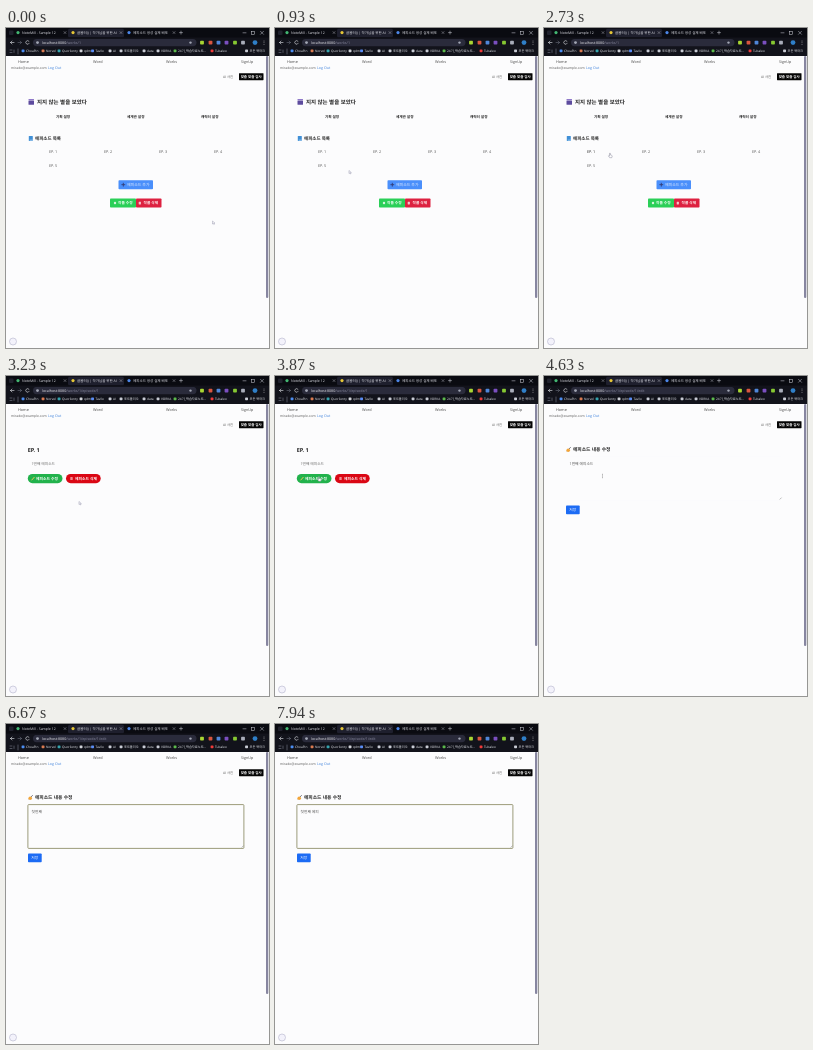
An HTML page that plays this animation: 263 px wide and 320 px high, repeating every 8 s.

```html
<!DOCTYPE html>
<html lang="ko">
<head>
<meta charset="utf-8">
<title>Episode editor</title>
<style>
html, body { margin: 0; width: 100%; height: 100%; overflow: hidden; background: #fcfcfd; }
svg { display: block; width: 263px; height: 320px; }
text {
  font-family: "Open Sans", "Noto Sans CJK KR", "Noto Sans CJK", "Noto Sans", sans-serif;
  text-rendering: geometricPrecision;
  white-space: pre;
}
</style>
</head>
<body>
<svg id="stage" viewBox="0 0 263 320" xmlns="http://www.w3.org/2000/svg"></svg>
<script>
const LOOP = 8000;
const stage = document.getElementById('stage');

const rect = (x, y, w, h, fill, r = 0, extra = '') =>
  `<rect x="${x}" y="${y}" width="${w}" height="${h}" rx="${r}" fill="${fill}" ${extra}/>`;
const dot = (x, y, r, fill) => `<circle cx="${x}" cy="${y}" r="${r}" fill="${fill}"/>`;
const line = (d, color, w = 0.6) =>
  `<path d="${d}" fill="none" stroke="${color}" stroke-width="${w}" stroke-linecap="round"/>`;
const text = (x, y, size, str, fill = '#444', weight = 400, extra = '') =>
  `<text x="${x}" y="${y}" font-size="${size}" fill="${fill}" font-weight="${weight}" ${extra}>${str}</text>`;
const group = (id, ...parts) => `<g id="${id}">${parts.join('')}</g>`;

function tab(x, w, icon, label, active) {
  return (active ? rect(x, 0.8, w, 8.4, '#1e1f2d', 1.5) : '') +
    dot(x + 5, 4.6, 1.6, icon) +
    text(x + 9, 5.9, 3.5, label, '#e4e5ec', 500) +
    line(`M${x + w - 4} 3.600l2 2m0-2l-2 2`, '#c4c6d0', 0.4);
}

function browser() {
  const marks = [
    [17, '#4c8df0', 'ChoaPin'], [37, '#d97a50', 'Norvel'], [53, '#35a3ad', 'Quorilenty'],
    [75, '#d0d2d8', 'qdm'], [86.5, '#5b8df5', 'Tavilo'], [104, '#c9ccd5', 'AI'],
    [115, '#c9ccd5', '포트폴리오'], [138, '#c9ccd5', 'data'], [152, '#c9ccd5', 'VORKA'],
    [169, '#5cba4c', '24기_학습자료노트...'], [206, '#ee3a3a', 'Tubaleo'],
    [240.5, '#c9ccd5', '모든 북마크']
  ];
  const tools = [[196, '#a9d632'], [204.5, '#d8553f'], [212.5, '#4f86d8'],
    [220.5, '#7b4fc0'], [229, '#86c832'], [237, '#a9adba']];
  return [
    rect(0, 0, 263, 28, '#0a0b11'),
    rect(3, 2.5, 4.5, 4.5, '#20222d', 1),
    tab(7, 55, '#43b873', 'NoteMill - Sample 12'),
    tab(62, 56, '#e6c736', '글봄터() | 작가님을 위한 AI', true),
    tab(118, 53, '#4c86e8', '에피소드 생성 실제 배포'),
    line('M173.500 4.600h3m-1.500-1.500v3', '#d3d5de', 0.5),
    line('M237 4.800h3M254.500 3.300l3 3m0-3l-3 3', '#d3d5de', 0.5),
    rect(245.5, 3.3, 3, 3, 'none', 0, 'stroke="#d3d5de" stroke-width=".5"'),
    rect(0, 9.5, 263, 18.5, '#12131b'),
    line('M8 14.500H4.500m1.500-1.500l-1.500 1.500 1.500 1.500', '#e3e4ea', 0.6),
    line('M12 14.500h3.500m-1.500-1.500l1.500 1.500-1.500 1.500', '#777b88', 0.5),
    line('M23 13.300a1.800 1.800 0 1 0 .2 2', '#e3e4ea', 0.6),
    rect(27, 10.9, 163.5, 7.4, '#2a2b3b', 3.7),
    dot(31.5, 14.6, 1.4, '#a3a7b5'),
    text(36, 15.9, 3.6, 'localhost:8080<tspan id="path" fill="#8a8ba0"></tspan>', '#f0f0f5', 500),
    dot(184.5, 14.6, 1.2, '#a3a7b5'),
    ...tools.map(([x, c]) => rect(x - 1.9, 12.7, 3.8, 3.8, c, 0.8)),
    dot(249, 14.6, 2.4, '#2f7fc8'),
    ...[13, 14.6, 16.2].map(y => dot(258, y, 0.45, '#ddd')),
    line('M4 22h2m-2 2.500h2M8 22v2.500M12 21v5', '#8d91a0', 0.5),
    ...marks.map(([x, c, label]) =>
      rect(x - 1.4, 21.4, 2.9, 2.9, c, 0.7) + text(x + 3, 24.2, 3.2, label, '#eceef4', 500))
  ].join('');
}

function header() {
  return [
    text(12, 35.2, 3.8, 'Home'), text(87, 35.2, 3.8, 'Word'),
    text(160, 35.2, 3.8, 'Works'), text(235, 35.2, 3.7, 'SignUp'),
    text(5, 40.7, 3.4, 'mirado@example.com', '#555'),
    text(42, 40.7, 3.6, 'Log Out', '#3f82dc'),
    text(217, 50.2, 3.4, 'AI 사진', '#555'),
    rect(233, 45.2, 24.5, 7, '#050505', 0.4),
    text(245.2, 50, 3.5, '맞춤 맞춤 검사', '#fff', 700, 'text-anchor="middle"'),
    rect(260, 28, 2.3, 242, '#8786a0', 1.1),
    `<circle cx="7" cy="313.5" r="3.5" fill="#f3f2fb" stroke="#b4b4cc" stroke-width=".6"/>`
  ].join('');
}

function listPage() {
  const eps = [[43, 124.5], [98, 124.5], [153, 124.5], [208, 124.5], [43, 139.3]];
  return group('list',
    rect(22.5, 72.5, 5.5, 4.2, '#5d4b9e', 0.5), rect(22.5, 71, 5.5, 1.3, '#8f79c9', 0.3),
    text(31, 75.9, 5.5, '지지 않는 별을 보았다', '#222', 700),
    text(50, 90, 3.6, '기획 설정', '#222', 700),
    text(121, 90, 3.6, '세계관 설정', '#222', 700),
    text(195, 90, 3.6, '캐릭터 설정', '#222', 700),
    rect(22.8, 108, 4, 5, '#3f8fd6', 0.5), rect(23.7, 111.8, 3, 0.6, '#e4f0fa'),
    text(29, 112.1, 4.5, '에피소드 목록', '#222', 700),
    ...eps.map(([x, y], i) => text(x, y, 3.8, 'EP. ' + (i + 1), '#555', 400, i ? '' : 'id="ep"')),
    rect(112.5, 152.2, 34.5, 9, '#4a8ffb', 0.8),
    line('M115.800 156.700h3m-1.500-1.500v3', '#343b74', 0.9),
    text(121, 158.1, 3.9, '에피소드 추가', '#eaf2ff', 500),
    rect(104, 170.5, 26, 9.1, '#2bcf58', 0.8), rect(130, 170.5, 25.5, 9.1, '#dd2140', 0.8),
    dot(109, 175, 1.2, '#d7f4de'), rect(132.7, 173.7, 2.2, 2.7, '#f4c7ce', 0.3),
    text(112, 176.4, 3.7, '작품 수정', '#f2fff5', 700),
    text(137.5, 176.4, 3.7, '작품 삭제', '#fff1f2', 700));
}

function viewPage() {
  return group('view',
    text(21.7, 75.9, 5.5, 'EP. 1', '#222', 700),
    text(25.5, 88.9, 3.7, '1번째 에피소드', '#666'),
    rect(21.8, 98, 34.7, 9.2, '#22b24c', 4.6), rect(60, 98, 34.7, 9.2, '#da0714', 4.6),
    line('M25.800 104l2.400-2.700', '#e7c55a', 1),
    rect(64.3, 101.1, 2.4, 3, '#f08b91', 0.4),
    text(30, 104, 3.8, '에피소드 수정', '#fff', 700),
    text(69, 104, 3.8, '에피소드 삭제', '#fff', 700));
}

function editPage() {
  return group('edit',
    line('M23.200 75l3.300-3.600', '#474a58', 0.7), dot(24.2, 74.3, 1.8, '#f2a53a'),
    text(29, 75.2, 4.75, '에피소드 내용 수정', '#222', 700),
    rect(21.9, 80.6, 216, 43.8, '#fcfcfd', 0.8, 'id="field" stroke-width=".8"'),
    line('M236 123.200l1.300-1.300', '#777', 0.5),
    rect(25.5, 84.2, 23.5, 5.4, '#2f7de0', 0, 'id="mark"'),
    text(25.5, 88.6, 3.75, '', '#555', 400, 'id="typed"'),
    rect(22, 129.5, 13.7, 8.7, '#1c6bf4', 0.8),
    text(25.3, 135.2, 3.8, '저장', '#fff', 500));
}

const pointers = group('pointer',
  '<path id="arrow" d="M0 0v3l.8-.6.500 1.100.6-.3-.5-1.100h1z" fill="#fff" stroke="#8485a0" stroke-width=".4"/>',
  '<path id="hand" d="M-.5-2.200q.5-.6.900 0v1.700l1.400.4q.5.200.4.700l-.4 1.600h-2.100l-1.300-1.800.4-.4.700.5z" fill="#fff" stroke="#6c6d84" stroke-width=".4"/>',
  '<path id="beam" d="M-.5-1.800h1M0-1.800v3.600M-.5 1.800h1" fill="none" stroke="#777" stroke-width=".4"/>');

stage.innerHTML = rect(0, 0, 263, 320, '#fcfcfd') + browser() + header() +
  listPage() + viewPage() + editPage() + pointers;

const $ = id => document.getElementById(id);
const show = (id, on) => $(id).setAttribute('visibility', on ? 'inherit' : 'hidden');

// time, x, y
const moves = [
  [0, 206.5, 193], [400, 206.5, 193], [630, 72, 172], [800, 72, 172], [930, 74, 142.5],
  [1360, 66, 127.5], [2730, 66, 127.5], [3000, 66, 127], [3230, 73, 125.5],
  [3570, 50, 106], [3800, 44, 103], [4000, 44, 103], [4370, 58.5, 100],
  [4630, 58.5, 100], [4720, 50, 87], [4860, 5, 86], [5000, 39, 132], [LOOP, 39, 132]
];
const looks = [[0, 'arrow'], [1250, 'hand'], [2860, 'arrow'], [3600, 'hand'], [3960, 'arrow'], [4200, 'beam']];
const pages = [[0, 'list', '/works/1'], [2860, 'view', '/works/1/episode/1'], [3960, 'edit', '/works/1/episode/1/edit']];
const typing = [
  [0, '1번째 에피소드'], [5730, 'ㅊ'], [5870, '처'], [5970, '첫'],
  [6140, '첫ㅂ'], [6200, '첫버'], [6270, '첫번'], [6500, '첫번ㅉ'], [6600, '첫번째'],
  [6900, '첫번째 ㅇ'], [7000, '첫번째 에'], [7370, '첫번째 에ㅍ'], [7800, '첫번째 에피']
];
const at = (steps, t) => steps.findLast(s => s[0] <= t);

function place(t) {
  const i = moves.findIndex(m => m[0] > t);
  const [t0, x0, y0] = moves[i - 1], [t1, x1, y1] = moves[i];
  const p = (t - t0) / (t1 - t0), e = p * p * (3 - 2 * p);
  return [x0 + (x1 - x0) * e, y0 + (y1 - y0) * e];
}

function draw(t) {
  const [, page, path] = at(pages, t);
  const look = at(looks, t)[1];
  const selected = t >= 4800 && t < 5730;
  for (const id of ['list', 'view', 'edit']) show(id, id === page);
  for (const id of ['arrow', 'hand', 'beam']) show(id, id === look);
  show('pointer', t < 5730);
  show('mark', selected);
  $('path').textContent = path;
  $('ep').setAttribute('fill', look === 'hand' ? '#222' : '#555');
  $('field').setAttribute('stroke', t >= 4720 ? '#84835a' : 'none');
  $('typed').textContent = at(typing, t)[1];
  $('typed').setAttribute('fill', selected ? '#fff' : '#555');
  $('pointer').setAttribute('transform', `translate(${place(t).join(' ')})`);
}

const start = performance.now();
function tick() {
  draw((performance.now() - start) % LOOP);
  requestAnimationFrame(tick);
}
tick();
</script>
</body>
</html>
```
